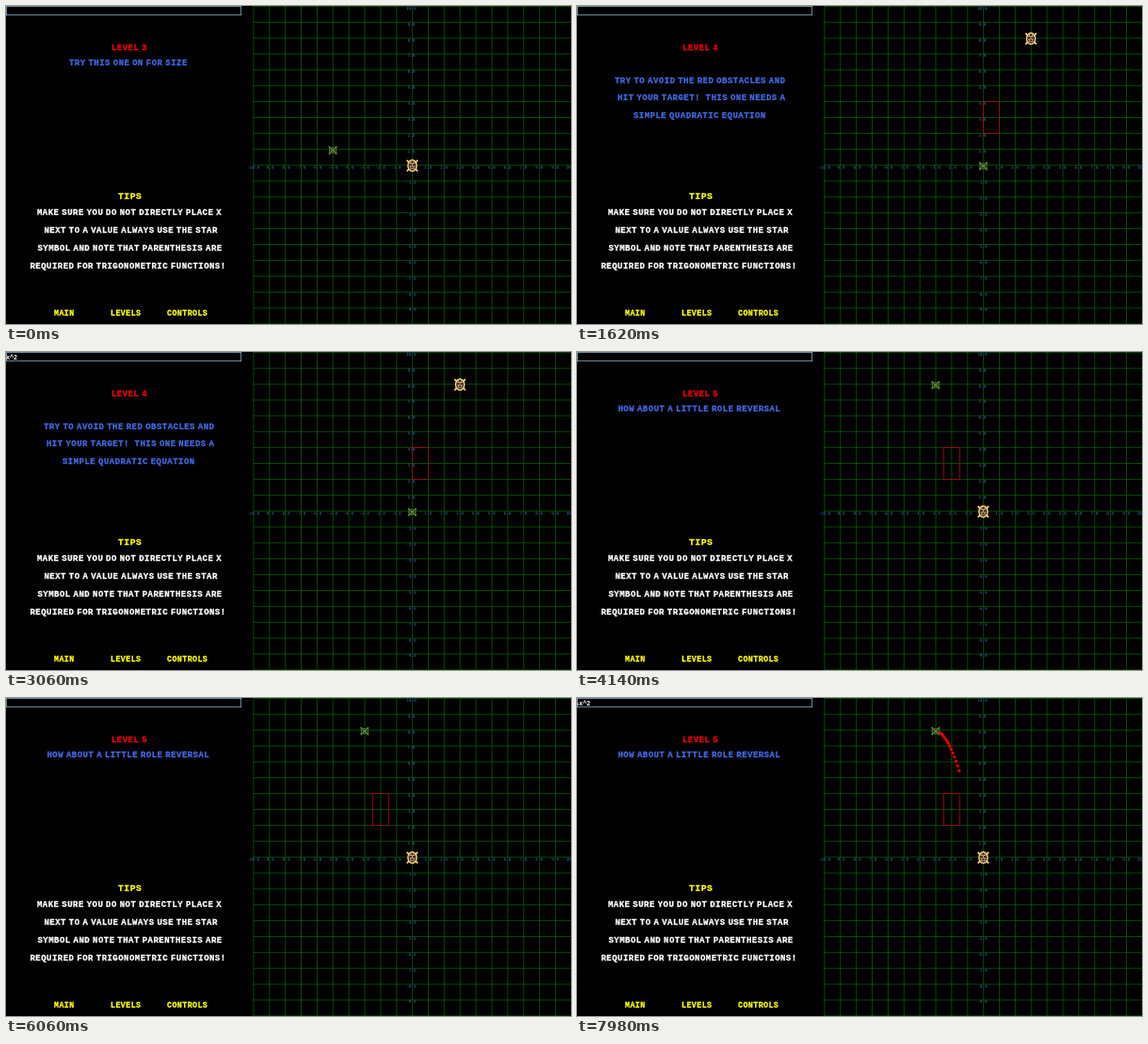
Recreate the animation shown at these times as an HTML page. Size 600 px wide and 338 px high, loop 8000 ms.

```html
<!DOCTYPE html>
<html lang="en">
<head>
<meta charset="utf-8">
<title>Graph shooter</title>
<style>
  html, body { margin: 0; width: 100%; height: 100%; overflow: hidden; background: #000; }
  svg { display: block; width: 100%; height: 100%; }
  .arcade { font: bold 9px "Liberation Mono", monospace; letter-spacing: .052em; word-spacing: -.335em; white-space: pre; stroke-width: .3; }
  .tick { font: 4.4px "DejaVu Sans Mono", monospace; fill: #3468b8; text-anchor: middle; }
  .input { font: bold 7px "Liberation Sans", Arial, sans-serif; fill: #fff; }
  .thin { fill: none; stroke-width: .75; }
</style>
</head>
<body>
<svg id="stage" viewBox="0 0 600 338">
  <defs>
    <g id="turtle" fill="none">
      <path d="M-5.8-5.8l2.5 2.5M5.8-5.8l-2.5 2.5M-5.8 6l2.5-2.5M5.8 6l-2.5-2.5" stroke="#ffd977" stroke-width="1.6"/>
      <ellipse rx="4.6" ry="5.9" fill="#2a1c1c" stroke="#ffdc82" stroke-width="1.4"/>
      <path d="M-3-2.3h6M-3 .5h6M-2.5 3.2h5M-1.5-4.5v2M1.5-4.5v2M0-2.3v2.5M-1.7 .5v2.5M1.7 .5v2.5" stroke="#d8a888"/>
    </g>
    <g id="shooter" fill="none">
      <rect x="-3" y="-3" width="6" height="6" fill="#1f3a16"/>
      <path d="M-3.5-4v8M3.5-4v8M-4-2.5h8M-4 2.5h8" stroke="#4e7d2c"/>
      <path d="M-2-1.5l4 3M2-1.5l-4 3" stroke="#7ba646"/>
      <path d="M-4.5-3.5h2M2.5-3.5h2M-4.5 3.5h2M2.5 3.5h2" stroke="#6f9c40"/>
    </g>
  </defs>
  <g id="board"></g>
  <g id="panel"></g>
  <rect class="thin" x=".375" y=".375" width="249.25" height="9.25" stroke="#8db6cd"/>
  <g id="level"></g>
  <path id="trail" fill="#f00"/>
  <text id="input" class="input" x="0" y="7.5"></text>
</svg>
<script>
const LOOP = 8000, UNIT = 16.875, ORIGIN_X = 431.25, ORIGIN_Y = 168.75;
const DOTS_PER_MS = 0.1, FIRST_DOT = 4, DOT = 2.9;
const RED = '#f00000', BLUE = '#4169e1', YELLOW = '#ffff00';
const el = id => document.getElementById(id);
const px = x => ORIGIN_X + x * UNIT;
const py = y => ORIGIN_Y - y * UNIT;

// Each key is [time, content of the input box]; coordinates are graph units.
const levels = [
  { start: 0, title: 'LEVEL 3', lines: [['TRY THIS ONE ON FOR SIZE', 67, 63]],
    shooter: [-5, 1], turtle: [0, 0],
    keys: [[360, '-'], [540, '-x'], [720, '-x/'], [900, '-x/5']],
    fire: 1130, curve: d => -d / 5 },
  { start: 1560, title: 'LEVEL 4',
    lines: [['TRY TO AVOID THE RED OBSTACLES AND', 40, 81.5],
            ['HIT YOUR TARGET!  THIS ONE NEEDS A', 43, 100],
            ['SIMPLE QUADRATIC EQUATION', 60, 119]],
    shooter: [0, 0], turtle: [3, 8], wall: [0, 4, 1, 2],
    keys: [[2640, 'x'], [2940, 'x^'], [3060, 'x^2']],
    fire: 3860, curve: d => d * d },
  { start: 4100, title: 'LEVEL 5', lines: [['HOW ABOUT A LITTLE ROLE REVERSAL', 43.5, 63]],
    shooter: [-3, 8], turtle: [0, 0], wall: [-2.5, 4, 1, 2],
    keys: [[7080, '-'], [7320, '-x'], [7520, '-x^'], [7640, '-x^2']],
    fire: 7860, curve: d => -d * d }
];

const label = (text, x, y, color, size = 9) =>
  `<text class="arcade" x="${x}" y="${y}" fill="${color}" stroke="${color}" style="font-size:${size}px">${text}</text>`;
const tickLabel = (value, x, y) =>
  `<text class="tick" x="${x}" y="${y + 3.8}">${value.toFixed(1)}</text>`;
const sprite = (name, [x, y], dy) =>
  `<use href="#${name}" x="${px(x) + .2}" y="${py(y) + dy}"/>`;

function drawBoard() {
  let grid = '', ticks = '';
  for (let i = -10; i <= 10; i++) {
    const x = px(i) + .375, y = py(i) + .375;
    grid += `M${x} 0V338M262.5 ${y}H600`;
    ticks += tickLabel(i, px(i), ORIGIN_Y);
    if (i) ticks += tickLabel(i, ORIGIN_X - .8, py(i));
  }
  el('board').innerHTML = `<path class="thin" d="${grid}" stroke="#006400"/>${ticks}`;
}

function drawPanel() {
  const tips = [
    ['MAKE SURE YOU DO NOT DIRECTLY PLACE X', 33, 222],
    ['NEXT TO A VALUE ALWAYS USE THE STAR', 40.5, 241],
    ['SYMBOL AND NOTE THAT PARENTHESIS ARE', 33.5, 259.5],
    ['REQUIRED FOR TRIGONOMETRIC FUNCTIONS!', 25.5, 278.5]
  ];
  const menu = [['MAIN', 51], ['LEVELS', 111], ['CONTROLS', 171]];
  el('panel').innerHTML = label('TIPS', 119, 205, YELLOW, 9.7)
    + tips.map(line => label(...line, '#fff')).join('')
    + menu.map(([text, x]) => label(text, x, 328.7, YELLOW, 8.3)).join('');
}

function drawLevel({ title, lines, shooter, turtle, wall }) {
  let out = label(title, 112, 47, RED) + lines.map(line => label(...line, BLUE)).join('');
  if (wall) {
    const [x, y, w, h] = wall;
    out += `<rect class="thin" x="${px(x) + .375}" y="${py(y) + .375}"
      width="${w * UNIT}" height="${h * UNIT}" stroke="#c00000"/>`;
  }
  el('level').innerHTML = out + sprite('shooter', shooter, 1.5) + sprite('turtle', turtle, .9);
}

function trailPath({ shooter: [x, y], fire, curve }, t) {
  if (t < fire) return '';
  const last = FIRST_DOT + Math.floor((t - fire) * DOTS_PER_MS);
  let d = '';
  for (let n = FIRST_DOT; n <= last; n++) {
    const run = n / 10;
    const left = px(x + run) - 1.8 - DOT / 2;
    const top = py(y + curve(run)) + .4 - DOT / 2;
    d += `M${left} ${top}h${DOT}v${DOT}h${-DOT}z`;
  }
  return d;
}

let shown;
function render(t) {
  const level = levels.findLast(l => t >= l.start);
  if (level !== shown) drawLevel(shown = level);
  const key = level.keys.findLast(([time]) => t >= time);
  el('input').textContent = key ? key[1] : '';
  el('trail').setAttribute('d', trailPath(level, t));
}

drawBoard();
drawPanel();
const begin = performance.now();
function tick() {
  render((performance.now() - begin) % LOOP);
  requestAnimationFrame(tick);
}
tick();
</script>
</body>
</html>
```
